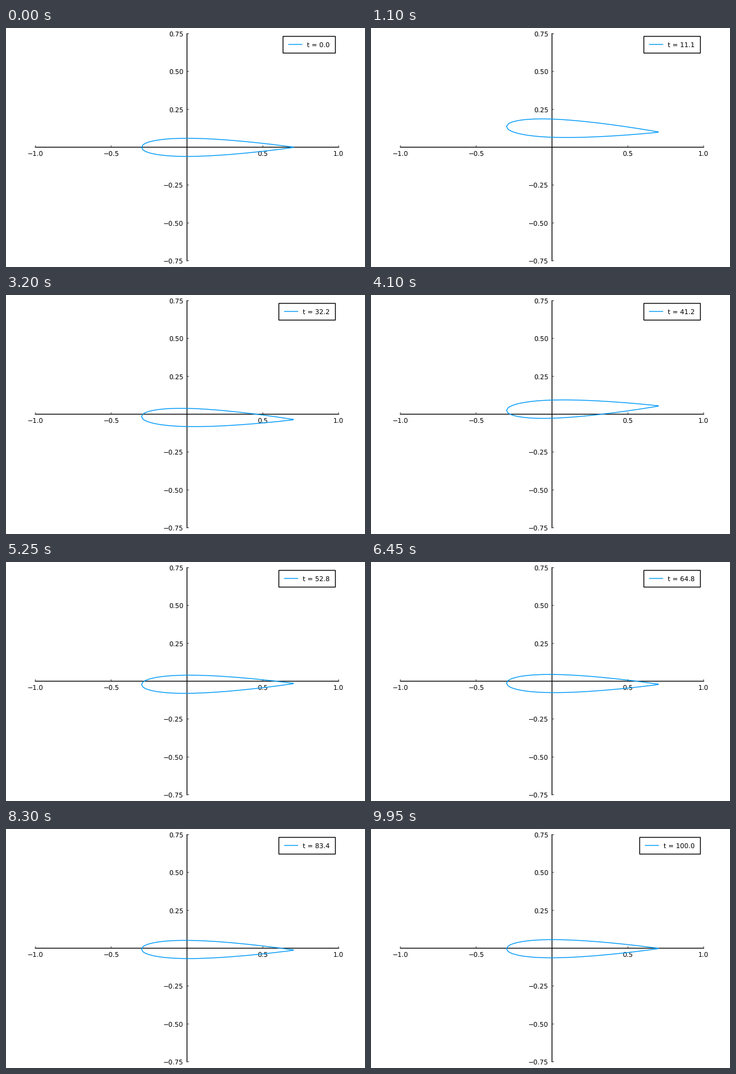
A matplotlib script that plays this animation: 600x400 px, repeating every 10 s.

```python
import numpy as np
import matplotlib.pyplot as plt
from matplotlib.animation import FuncAnimation
from matplotlib.patches import Rectangle

plt.rcParams.update({
    "font.family": "DejaVu Sans",
    "font.size": 7.92,
    "text.hinting": "none",
    "lines.solid_joinstyle": "round",
})

W, H, DPI = 600, 400, 100
FRAMES, INTERVAL, T_END = 200, 50, 100.0
X0, Y0, SCALE = 302.5, 199.5, 253.4
BLUE = "#009AF9"

# Two damped modes of the wing section: plunge and pitch
PLUNGE_RATE, PITCH_RATE = -0.035 + 0.402j, -0.0365 + 0.961j
PLUNGE_AMP, PITCH_AMP = 0.009 - 0.377j, -0.022 + 0.100j
PITCH_PER_PLUNGE, PLUNGE_PER_PITCH = 0.11 + 0.055j, -0.054 + 0.083j


def to_px(x, y):
    return X0 + SCALE * x, Y0 - SCALE * y


def pose(t):
    """Height and nose-up angle of the section at time t."""
    plunge = PLUNGE_AMP * np.exp(PLUNGE_RATE * t)
    pitch = PITCH_AMP * np.exp(PITCH_RATE * t)
    height = -0.5 * (plunge + PLUNGE_PER_PITCH * pitch).real
    angle = (PITCH_PER_PLUNGE * plunge + pitch).real
    return height, angle


def section():
    """Closed outline of a symmetric 12 % thick section of unit chord."""
    x = np.linspace(0, 1, 101)
    y = 0.6 * (0.2969 * np.sqrt(x) - 0.1260 * x - 0.3516 * x**2
               + 0.2843 * x**3 - 0.1015 * x**4)
    xs = np.concatenate([x[::-1], x[1:], x[-1:]])
    ys = np.concatenate([y[::-1], -y[1:], y[-1:]])
    return xs - 0.3, ys


fig = plt.figure(figsize=(W / DPI, H / DPI), dpi=DPI, facecolor="white")
ax = fig.add_axes([0, 0, 1, 1])
ax.set_xlim(0, W)
ax.set_ylim(H, 0)
ax.axis("off")


def stroke(xs, ys, color="black", lw=1.0, z=1):
    return ax.plot(xs, ys, color=color, lw=lw, zorder=z, snap=False)[0]


def label(x, y, text, ha, z=1):
    return ax.text(x, y, text, ha=ha, va="baseline", color="black", zorder=z)


def draw_axes():
    left, top = to_px(-1, 0.75)
    right, bottom = to_px(1, -0.75)
    stroke([left, right], [Y0, Y0])
    stroke([X0, X0], [top, bottom])
    for v in (-1.0, -0.5, 0.5, 1.0):
        x, _ = to_px(v, 0)
        stroke([x, x], [Y0, Y0 - 3], lw=0.5)
        label(x, 214, f"{v:.1f}".replace("-", "\u2212"), "center")
    for v in (-0.75, -0.5, -0.25, 0.25, 0.5, 0.75):
        _, y = to_px(0, v)
        stroke([X0, X0 + 3], [y, y], lw=0.5)
        label(297, y + 4.2, f"{v:.2f}".replace("-", "\u2212"), "right")


draw_axes()
shape_x, shape_y = section()
wing = stroke([], [], BLUE, z=2)

box = ax.add_patch(Rectangle((463, 14), 87.5, 28, fc="white", ec="black",
                             lw=1.0, zorder=3, snap=False))
key = stroke([], [], BLUE, z=4)
caption = label(503, 32, "", "left", z=4)


def update(i):
    t = T_END * i / (FRAMES - 1)
    height, angle = pose(t)
    c, s = np.cos(angle), np.sin(angle)
    wing.set_data(*to_px(c * shape_x + s * shape_y,
                         height - s * shape_x + c * shape_y))

    value = f"{t:.1f}"
    left = 463 - 7 * (len(value) - 3)
    box.set_x(left)
    box.set_width(550.5 - left)
    key.set_data([left + 9.5, left + 31.5], [27.5, 27.5])
    caption.set_x(left + 40)
    caption.set_text(f"t = {value}")
    return wing, box, key, caption


anim = FuncAnimation(fig, update, frames=FRAMES, interval=INTERVAL,
                     repeat=True, repeat_delay=0, blit=False)
plt.show()
```
